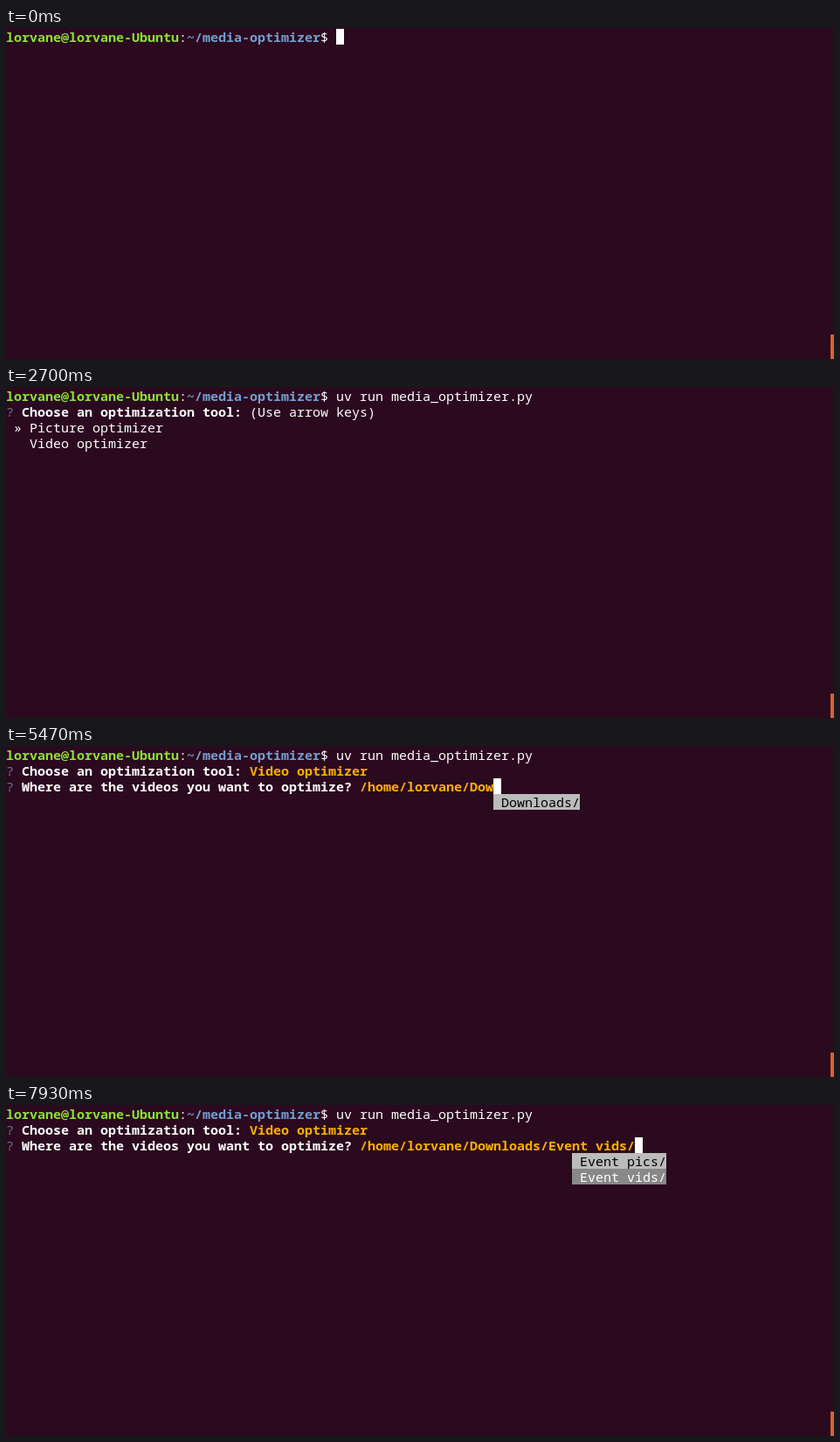
An HTML page with a canvas for the animation above (8 s loop, 948 by 379 pixels).

```html
<!DOCTYPE html>
<html lang="en">
<head>
<meta charset="utf-8">
<title>Terminal session</title>
<style>
  html, body { margin: 0; width: 100%; height: 100%; overflow: hidden; background: #2b091e; }
  canvas { display: block; }
</style>
</head>
<body>
<canvas id="term" width="948" height="379"></canvas>
<script>
const ctx = document.getElementById('term').getContext('2d');
const LOOP = 8000, CELL_W = 9, CELL_H = 18, TOP = 1, BASELINE = 15;
const FONT = '15px "Noto Sans Mono", "DejaVu Sans Mono", monospace';
const COLOR = {
  back: '#2b091e', text: '#ffffff', user: '#8ae234', dir: '#729fcf',
  mark: '#5f7590', answer: '#ffaf00', menu: '#bbbbbb', picked: '#888888', bar: '#d66034'
};
const USER = 'lorvane';
const CMD_COL = 42, PATH_COL = 45;

// [time, typed command, cursor visible]
const COMMAND = [
  [0, '', true], [330, '', false], [770, '', true], [830, 'u', true], [970, 'uv', true],
  [1170, 'uv ', true], [1230, 'uv r', true], [1370, 'uv ru', true], [1470, 'uv run', true],
  [1530, 'uv run ', true], [1730, 'uv run m', true], [1970, 'uv run me', true],
  [2000, 'uv run media_optimizer.py ', true], [2330, 'uv run media_optimizer.py ', false],
  [2530, 'uv run media_optimizer.py ', true], [2560, 'uv run media_optimizer.py ', false]
];

// [time, typed path, menu items, menu column offset, picked item]
const EVENTS = ['Event pics/', 'Event vids/'];
const PATH = [
  [4000, ''],
  [4900, 'D', ['Desktop/', 'Documents/', 'Downloads/'], 1],
  [4970, 'Do', ['Documents/', 'Downloads/'], 2],
  [5470, 'Dow', ['Downloads/'], 3],
  [5970, 'Downloads/', ['Downloads/'], 3, 0],
  [6130, 'Downloads/'],
  [6970, 'Downloads/E', EVENTS, 11],
  [7230, 'Downloads/Ev', EVENTS, 12],
  [7470, 'Downloads/Eve', EVENTS, 13],
  [7900, 'Downloads/Event vids/', EVENTS, 13, 1]
];

const latest = (steps, t) => steps.filter(s => s[0] <= t).pop();

function fillCells(col, row, count, color) {
  ctx.fillStyle = color;
  ctx.fillRect(col * CELL_W, TOP + row * CELL_H, count * CELL_W, CELL_H);
}

// Writes on the character grid and returns the next free column.
function write(col, row, text, color, bold) {
  ctx.font = (bold ? 'bold ' : '') + FONT;
  ctx.fillStyle = color;
  for (const ch of text) ctx.fillText(ch, col++ * CELL_W, TOP + row * CELL_H + BASELINE);
  return col;
}

const cursor = (col, row) => fillCells(col, row, 1, COLOR.text);

function question(row, text) {
  write(0, row, '?', COLOR.mark);
  return write(2, row, text, COLOR.text, true) + 1;
}

function drawShell(t) {
  let col = write(0, 0, `${USER}@${USER}-Ubuntu`, COLOR.user, true);
  col = write(col, 0, ':', COLOR.text);
  col = write(col, 0, '~/media-optimizer', COLOR.dir, true);
  write(col, 0, '$', COLOR.text);
  const [, typed, shown] = latest(COMMAND, t);
  col = write(CMD_COL, 0, typed, COLOR.text);
  if (shown) cursor(col, 0);
}

function drawChoice(t) {
  const col = question(1, 'Choose an optimization tool:');
  if (t >= 3970) {
    write(col, 1, 'Video optimizer', COLOR.answer, true);
    return;
  }
  write(col, 1, '(Use arrow keys)', COLOR.text);
  write(1, t < 3470 ? 2 : 3, '»', COLOR.text);
  write(3, 2, 'Picture optimizer', COLOR.text);
  write(3, 3, 'Video optimizer', COLOR.text);
}

function drawMenu(col, items, picked) {
  const width = Math.max(...items.map(s => s.length)) + 1;
  items.forEach((item, i) => {
    const on = i === picked;
    fillCells(col, 3 + i, width, on ? COLOR.picked : COLOR.menu);
    write(col + 1, 3 + i, item, on ? COLOR.text : '#000000');
  });
}

function drawPath(t) {
  question(2, 'Where are the videos you want to optimize?');
  const base = write(PATH_COL, 2, `/home/${USER}/`, COLOR.answer, true);
  const [, typed, items, offset, picked] = latest(PATH, t);
  cursor(write(base, 2, typed, COLOR.answer, true), 2);
  if (items) drawMenu(base + offset, items, picked);
}

function draw(t) {
  ctx.fillStyle = COLOR.back;
  ctx.fillRect(0, 0, 948, 379);
  ctx.fillStyle = COLOR.bar;
  ctx.fillRect(944, 351, 4, 28);
  drawShell(t);
  if (t >= 2560 && t < 2700) cursor(0, 1);
  if (t >= 2700) drawChoice(t);
  if (t >= 4000) drawPath(t);
}

const start = performance.now();
function frame() {
  draw((performance.now() - start) % LOOP);
  requestAnimationFrame(frame);
}
frame();
</script>
</body>
</html>
```
